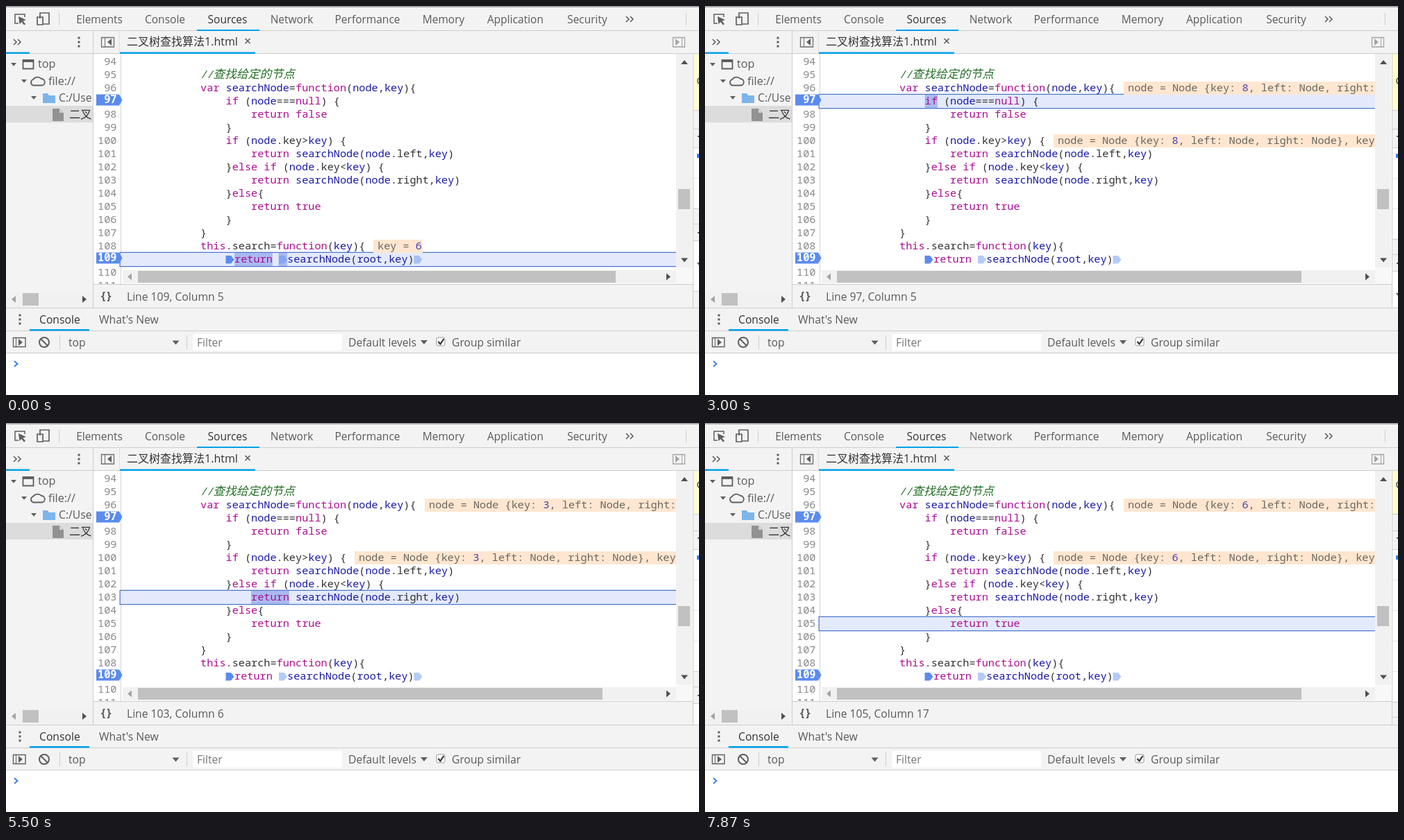
Recreate the animation shown at these times as an HTML page. Size 998x561 px, loop 8000 ms.

```html
<!DOCTYPE html>
<html lang="en">
<head>
<meta charset="utf-8">
<title>Stepping through a tree search</title>
<style>
html, body { margin: 0; width: 100%; height: 100%; overflow: hidden; background: #fff; }
svg { display: block; width: 998px; height: 561px; }
text { white-space: pre; }
.ui { font: 15.7px "Open Sans", "Noto Sans CJK SC", "Noto Sans CJK", sans-serif; fill: #5a5a5a; }
.tree { font-size: 16.2px; }
.code { font: 15.22px "Noto Sans Mono", "Noto Sans CJK SC", "Noto Sans CJK", monospace; fill: #303030; }
.keyword { fill: #ab0d90; }
.name { fill: #1a1aa6; }
.comment { fill: #236e25; font-style: italic; }
.comment .han { font-size: 16.8px; }
.number { fill: #888; text-anchor: end; }
.hint { fill: #6b6660; }
.value { fill: #4a3fae; }
</style>
</head>
<body>
<svg viewBox="0 0 998 561">
  <defs>
    <clipPath id="editorClip"><path d="M126 70H965V377H126Z"/></clipPath>
    <clipPath id="gutterClip"><path d="M126 70H168V401H126Z"/></clipPath>
    <clipPath id="treeClip"><path d="M0 70H124V412H0Z"/></clipPath>
    <clipPath id="sideClip"><path d="M989 69H998V435H989Z"/></clipPath>
  </defs>
  <g id="base"></g>
  <g id="active" clip-path="url(#editorClip)"></g>
  <g id="code" clip-path="url(#editorClip)"></g>
  <g id="hints" clip-path="url(#editorClip)"></g>
  <g id="gutter" clip-path="url(#gutterClip)"></g>
  <g id="side" clip-path="url(#sideClip)"></g>
  <g id="status"></g>
</svg>
<script>
const LOOP = 8000, CHAR = 9.132, ROW = 19, LEFT = 280, BASELINE = 4.8, RULE = 1.27;
const BLUE = '#5b8bee', PALE_BLUE = '#5b8bee73', MARK = '#a9baf0', ACTIVE_EDGE = '#4f78d0';
const ACCENT = '#03a0e8', BAR = '#f3f3f3', EDGE = '#cdcdcd', INK = '#5f5f5f';

const source = [
  '', '//查找给定的节点', 'var searchNode=function(node,key){', '    if (node===null) {',
  '        return false', '    }', '    if (node.key>key) {',
  '        return searchNode(node.left,key)', '    }else if (node.key<key) {',
  '        return searchNode(node.right,key)', '    }else{', '        return true',
  '    }', '}', 'this.search=function(key){'
];

// start ms, line, column, marked text start, marked length, node key, key in the line 100 hint, stack depth, stopped at breakpoint
const steps = [
  [0, 109, 5, 5.37, 6, 0, 0, 2, true],
  [500, 97, 5, 4, 2, 8, 0, 3, true],
  [1250, 100, 14, 13, 3, 8, 0, 3, false],
  [2000, 101, 6, 8, 6, 8, 8, 3, false],
  [3000, 97, 5, 4, 2, 8, 8, 3, true],
  [3120, 97, 5, 4, 2, 3, 0, 4, true],
  [3750, 100, 14, 13, 3, 3, 0, 4, false],
  [4500, 102, 20, 19, 3, 3, 3, 4, false],
  [5500, 103, 6, 8, 6, 3, 3, 4, false],
  [6000, 97, 5, 4, 2, 3, 3, 4, true],
  [6120, 97, 5, 4, 2, 6, 0, 5, true],
  [6500, 100, 14, 13, 3, 6, 0, 5, true],
  [6620, 100, 14, 13, 3, 6, 0, 5, false],
  [7120, 102, 20, 19, 3, 6, 6, 5, false],
  [7500, 105, 6, 8, 6, 6, 6, 5, false],
  [7870, 105, 17, 0, 0, 6, 6, 5, false]
];

const put = (id, ...parts) => { document.getElementById(id).innerHTML = parts.join(''); };
const box = (x, y, w, h, fill, more = '') => `<rect x="${x}" y="${y}" width="${w}" height="${h}" fill="${fill}" ${more}/>`;
const hline = (x, y, w, fill = EDGE) => box(x, y, w, 1, fill);
const vline = (x, y, h, fill = EDGE) => box(x, y, 1, h, fill);
const fillPath = (d, fill = INK) => `<path d="${d}" fill="${fill}"/>`;
const stroke = (d, color = INK, width = 1.6) => `<path d="${d}" fill="none" stroke="${color}" stroke-width="${width}"/>`;
const text = (x, y, content, cls = 'ui', more = '') => `<text x="${x}" y="${y}" class="${cls}" ${more}>${content}</text>`;
const down = (x, y, r = 5, fill = INK) => fillPath(`M${x - r} ${y - r / 2}h${2 * r}l${-r} ${r * 1.2}z`, fill);
const up = (x, y) => fillPath(`M${x - 5} ${y + 3}h10l-5 -6z`, '#505050');
const sideways = (x, y, dir, fill = '#505050') => fillPath(`M${x - 3 * dir} ${y - 5}v10l${6 * dir} -5z`, fill);
const chevrons = (x, y) => stroke(`M${x} ${y - 4}l4 4l-4 4m6 -8l4 4l-4 4`);
const dots = (x, y) => [-6, 0, 6].map(d => box(x - 1.5, y + d - 1.5, 3, 3, INK)).join('');
const rowMid = line => 80.5 + (line - 94) * ROW;

function drawBase() {
  const tabs = [['Elements', 134.5], ['Console', 229], ['Sources', 319], ['Network', 411.5],
    ['Performance', 520.5], ['Memory', 630], ['Application', 733.5], ['Security', 837]];
  const toolbar = [
    box(0, 0, 998, 36, BAR), box(0, 0, 998, 2, '#a9a5a9'), hline(0, 35, 998),
    stroke('M18 25H13V12H27V16', INK, 1.5), fillPath('M18 15L29 20L24.500 21.500L28 26L26 27.500L22.500 23L19.500 26Z'),
    stroke('M49 18V10H62V26H54', INK, 1.7), stroke('M45 16H53V27H45Z', INK, 1.7),
    vline(76, 10, 18), vline(979, 10, 18), box(275, 34, 90, 2, ACCENT),
    ...tabs.map(([name, x]) => text(x, 24.5, name, 'ui', `text-anchor="middle" style="font-size:15.5px${name === 'Sources' ? ';fill:#333' : ''}"`)),
    chevrons(893, 19)
  ];
  const tree = [
    box(0, 36, 125, 399, BAR), chevrons(11, 52), dots(105, 52), hline(0, 68, 125), box(0, 66.5, 34, 2.5, ACCENT),
    box(0, 144, 125, 24, '#dcdcdc'),
    down(11, 84, 4), down(26, 108, 4), down(40, 132, 4),
    stroke('M24.500 78H39.500V90.500H24.500Z', INK, 1.8), box(24, 77, 16, 4, INK),
    stroke('M39 114.500a4.500 4.500 0 0 1 0 -8.500a7 6 0 0 1 12 -1a4.800 4.800 0 0 1 1 9.500z', INK, 1.8),
    fillPath('M53 126h7l2 3h9v11H53z', '#7db4ec'), fillPath('M67 148h10l6 6v12H67z', '#929292'), fillPath('M77 148v6h6z', '#d0d0d0'),
    '<g clip-path="url(#treeClip)">', text(46, 89, 'top', 'ui tree'), text(61, 113.5, 'file://', 'ui tree'),
    text(76, 137.5, 'C:/Use'), text(91, 162, '二叉', 'ui tree', 'style="fill:#333"'), '</g>',
    box(0, 413, 125, 21, '#f1f1f1'), box(24, 414, 23, 18, '#c1c1c1'), sideways(11, 423, -1, '#a3a3a3'), sideways(113, 423, 1),
    vline(125, 36, 399)
  ];
  const editor = [
    box(126, 36, 872, 33, BAR), hline(126, 68, 872),
    stroke('M137.500 45.500H155.500V59H137.500Z', '#6e6e6e', 1.3), vline(142, 45, 14, '#6e6e6e'), sideways(149, 52, -1, INK),
    vline(163, 37, 31, '#e0e0e0'), text(174, 56.5, '二叉树查找算法1.html', 'ui', 'style="font-size:16px;fill:#333"'),
    stroke('M344.500 47L351.500 54M351.500 47L344.500 54', INK, 1.7), box(164, 66.5, 195, 2.5, ACCENT),
    stroke('M960.500 45.500H977.500V59H960.500Z', '#a5a5a5', 1.3), vline(973, 45, 14, '#a5a5a5'), sideways(967, 52, 1, '#a5a5a5'),
    box(126, 69, 863, 332, '#fff'), vline(165, 69, 332, '#d4d4d4'),
    box(965, 69, 23, 308, '#f1f1f1'), box(968, 264, 17, 29, '#c1c1c1'), up(977, 81), down(977, 366, 5, '#505050'),
    box(168, 381, 797, 19, '#f1f1f1'), box(965, 377, 23, 24, '#f8f8f8'),
    sideways(178, 390.5, -1, '#a3a3a3'), sideways(954, 390.5, 1),
    box(126, 401, 863, 34, BAR), hline(126, 401, 863), text(137, 424, '{}', 'ui', 'style="font-weight:700;letter-spacing:2px"')
  ];
  const drawer = [
    box(0, 435, 998, 66, BAR), hline(0, 435, 998), hline(0, 468, 998), hline(0, 500, 998),
    dots(20, 452), text(48, 458, 'Console', 'ui', 'style="fill:#333"'), text(134, 458, 'What\'s New'), box(34, 466, 86, 2.5, ACCENT),
    stroke('M10.500 478.500H28V491.500H10.500Z', INK, 1.4), vline(14, 478, 14, INK), sideways(21, 485, 1, INK),
    '<circle cx="55" cy="485" r="7" fill="none" stroke="#5f5f5f" stroke-width="2"/>', stroke('M50 480L60 490', INK, 2),
    vline(77, 475, 20), text(90, 491, 'top'), down(244.5, 485), vline(260, 475, 20),
    box(269, 473, 215, 24, '#fff'), text(275, 491, 'Filter', 'ui', 'style="fill:#777"'),
    text(493, 491, 'Default levels'), down(602, 484.5),
    box(620, 478, 12, 12, '#fff', 'rx="2" stroke="#999"'), stroke('M622.500 484l3 3.500l5 -7.500', '#333', 2.2),
    text(642, 491, 'Group similar'),
    box(0, 501, 998, 60, '#fff'), stroke('M12 512l4.500 4l-4.500 4', '#3f80ee', 2)
  ];
  put('base', ...toolbar, ...tree, ...editor, ...drawer);
}

function colorize(line) {
  if (line.startsWith('//')) return `<tspan class="comment">//<tspan class="han">${line.slice(2)}</tspan></tspan>`;
  return line.replace(/\.?[a-z]\w*|[<>]/gi, word => {
    if (word === '<') return '&lt;';
    if (word === '>') return '&gt;';
    if (word[0] === '.') return word;
    const cls = /^(var|function|if|else|return|this|true|false|null)$/.test(word) ? 'keyword' : 'name';
    return `<tspan class="${cls}">${word}</tspan>`;
  });
}

const tag = (x, fill) => fillPath(`M${x} 360h7.500l4.500 5.800l-4.500 5.800h-7.500z`, fill);

function drawCode() {
  const y = rowMid(109) + BASELINE;
  put('code',
    ...source.map((line, i) => text(LEFT, rowMid(94 + i) + BASELINE, colorize(line), 'code')),
    tag(316.5, BLUE), tag(393, PALE_BLUE), tag(587.5, PALE_BLUE),
    text(329, y, colorize('return'), 'code'), text(405, y, colorize('searchNode(root,key)'), 'code'));

  const numbers = [];
  for (let line = 94; line <= 111; line++) {
    const stop = line === 97 || line === 109, mid = rowMid(line) - (stop ? 2 : 0);
    if (stop) numbers.push(fillPath(`M130 ${mid - 8}h33l4.500 8l-4.500 8h-33z`, BLUE));
    numbers.push(text(159.5, mid + BASELINE, line, 'code number', stop ? 'style="fill:#fff;font-weight:600"' : ''));
  }
  put('gutter', ...numbers);
}

function hint(x, line, content, width = 400) {
  const value = content.replace(/\d/, '<tspan class="value">$&</tspan>');
  return box(x, rowMid(line) - 9.5, width, 19, '#ffe6d0') + text(x + 6, rowMid(line) + BASELINE, value, 'code hint');
}

function drawSide(depth, atBreakpoint) {
  const noticeEnd = atBreakpoint ? 150 : 131;
  const stackTop = atBreakpoint ? 204 : 182;
  const stackEnd = stackTop + 44 * depth;
  const frames = Array.from({length: depth}, (_, i) => hline(990, stackTop + 44 * (i + 1), 8, '#e6e6e6'));
  put('side',
    box(989, 69, 9, 366, '#fff'), box(989, 69, 9, noticeEnd - 69, '#fffbd2'),
    stroke(`M999 ${noticeEnd - 46}q-3 0 -3 4t3 4`, '#444', 1.3),
    box(989, noticeEnd, 9, stackTop - noticeEnd, BAR), hline(989, noticeEnd, 9), hline(989, stackTop - 27, 9), hline(989, stackTop, 9),
    box(996, stackTop - 17, 2, 2, INK), box(995, stackTop + 9, 3, 6, '#3f80ee'), ...frames,
    box(989, stackEnd, 9, 46, BAR), hline(989, stackEnd, 9), hline(989, stackEnd + 22, 9), hline(989, stackEnd + 46, 9),
    box(996, stackEnd + 34, 2, 2, INK), fillPath(`M995 ${stackEnd + 78}h3v4z`),
    box(989, stackEnd + 119, 9, 60, BAR), hline(989, stackEnd + 119, 9), vline(989, 69, 366));
}

function drawStep([, line, column, markStart, markLength, nodeKey, hintKey, depth, atBreakpoint]) {
  const top = rowMid(line) - ROW / 2, onCall = line === 109;
  const details = key => `node = Node {key: ${key}, left: Node, right: Node}, key = 6`;
  put('active',
    box(164, top, 801, ROW, '#e3eafc'),
    box(163.5, top - RULE, 802, RULE, ACTIVE_EDGE), box(163.5, top + ROW, 802, RULE, ACTIVE_EDGE),
    box(163.5, top, RULE, ROW, ACTIVE_EDGE),
    box(LEFT + markStart * CHAR, top, markLength * CHAR, ROW, MARK),
    onCall ? box(392.5, top, 12.5, ROW, MARK) : '');
  put('hints',
    nodeKey ? hint(603, 96, details(nodeKey)) : hint(529, 108, 'key = 6', 71),
    hintKey ? hint(502, 100, details(hintKey), 463) : '');
  drawSide(depth, atBreakpoint);
  put('status', box(190, 382, onCall ? 688 : 669, 17, '#c1c1c1'), text(174, 424.5, `Line ${line}, Column ${column}`));
}

let shown;
function update(now) {
  const time = now % LOOP;
  const step = steps.findLast(([start]) => start <= time);
  if (step !== shown) drawStep(shown = step);
}

function tick() {
  update(performance.now());
  requestAnimationFrame(tick);
}

drawBase();
drawCode();
tick();
</script>
</body>
</html>
```
